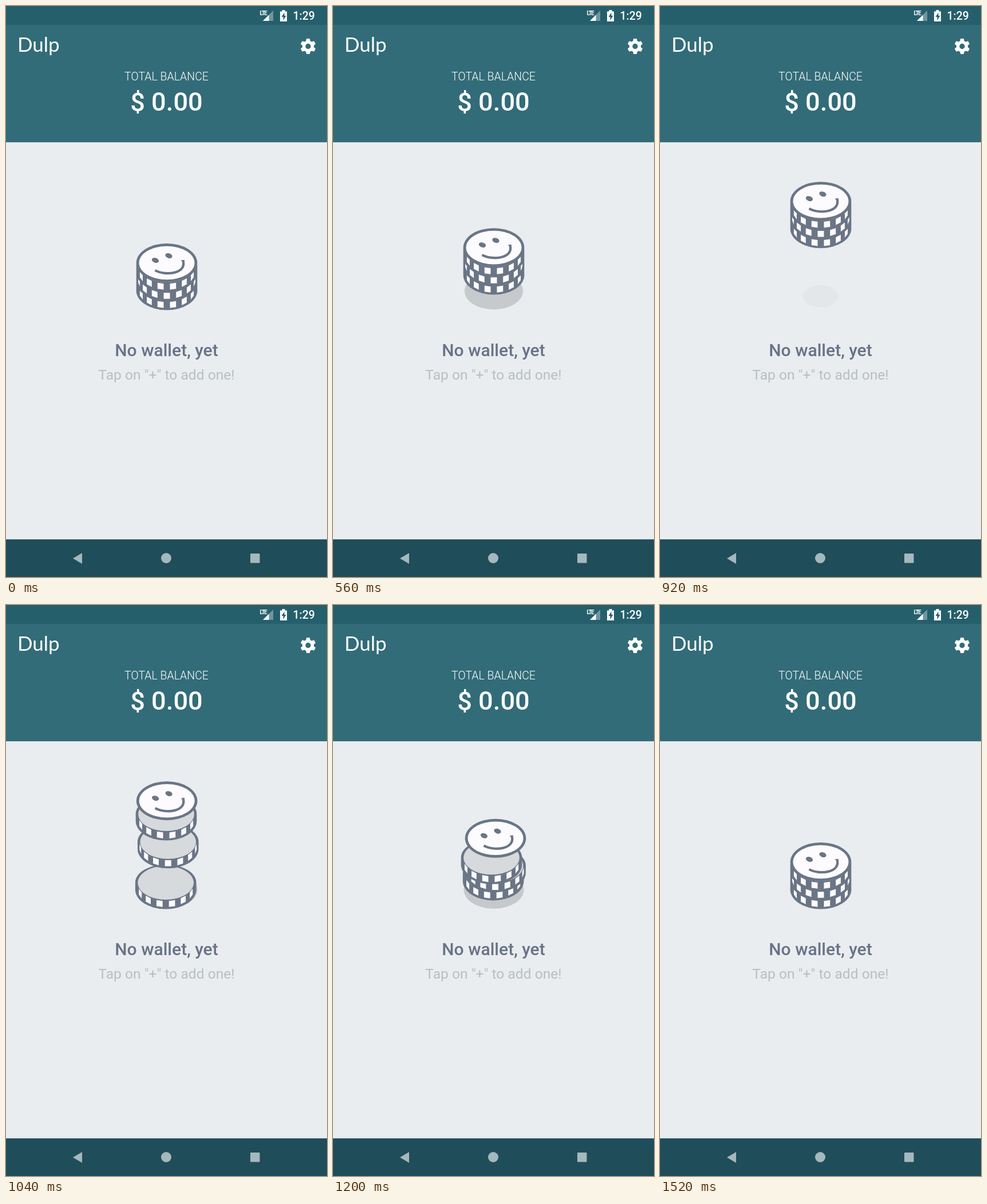
An HTML page for the animation above (1600 ms loop, 561 by 998 pixels).

```html
<!DOCTYPE html>
<html lang="en">
<head>
<meta charset="utf-8">
<title>Empty wallet</title>
<style>
  html, body { margin: 0; height: 100%; overflow: hidden; background: #e9edf0; }
  svg { display: block; width: 100vw; height: 100vh; font-family: Roboto, sans-serif; }
  .mid { text-anchor: middle; }
</style>
</head>
<body>
<svg viewBox="0 0 561 998">
  <rect width="561" height="998" fill="#e9edf0"/>
  <rect width="561" height="238.2" fill="#326c78"/>
  <rect width="561" height="33" fill="#265f6c"/>
  <rect y="932.2" width="561" height="66" fill="#1f4d5a"/>

  <g fill="#fff">
    <text x="443.5" y="15.5" font-size="10" font-weight="700" letter-spacing="-1.5">LTE</text>
    <path d="M467 8V26H449Z" opacity=".35"/>
    <path d="M459.5 15.5V26H449Z"/>
    <path d="M482.5 7h5v2.5h3.5v17.5h-12v-17.5h3.5z"/>
    <path d="M486.5 11.5v5.5h3l-5 8v-6h-3z" fill="#265f6c"/>
    <text x="501.5" y="24" font-size="19.5" font-weight="500">1:29</text>
    <text x="20" y="80" font-size="35" font-family="Lato, sans-serif">Dulp</text>
    <g id="gear" transform="translate(528 70.5)">
      <circle r="7.4" fill="none" stroke="#fff" stroke-width="5.4"/>
    </g>
    <text class="mid" x="280.5" y="130.3" font-size="19.5" font-weight="300">TOTAL BALANCE</text>
    <text class="mid" x="280.5" y="183.2" font-size="45.2" font-weight="500">$ 0.00</text>
  </g>

  <text class="mid" x="280.5" y="612" font-size="30" font-weight="500" fill="#697286">No wallet, yet</text>
  <text class="mid" x="280.5" y="653" font-size="24.6" fill="#b9bec1">Tap on "+" to add one!</text>

  <g fill="#a5b8be">
    <path d="M117 965.5L133 956V975Z"/>
    <circle cx="280" cy="965" r="9"/>
    <rect x="427" y="957" width="16.5" height="16.5" rx="1"/>
  </g>

  <ellipse id="shadow" rx="53.5" ry="34"/>
  <g id="stack"></g>
</svg>
<script>
const LOOP = 1600, STEP = 40, DARK = '#6a7586';
const $ = id => document.getElementById(id);

for (let a = 0; a < 360; a += 60)
  $('gear').innerHTML += `<path d="M-4 -8L-2.8 -13.5H2.8L4 -8Z" transform="rotate(${a})"/>`;

// One white patch on the rim, centred at an angle in degrees
function patch(deg) {
  const point = (d, dy) => {
    const a = d * Math.PI / 180;
    return `${(50.5 * Math.sin(a)).toFixed(2)} ${(34 * Math.cos(a) + dy).toFixed(2)}`;
  };
  const l = deg - 6.25, r = deg + 6.25;
  return `M${point(l, 2)}L${point(r, 2)}L${point(r, 12.5)}L${point(l, 12.5)}Z`;
}

function coin(first) {
  let rim = '';
  for (let a = first; a <= 75; a += 25) rim += patch(a);
  return `<path d="M-53.3 3.5A53.3 31.5 0 0 1 53.3 3.5V16A53.3 34 0 0 1 -53.3 16Z" fill="${DARK}"/>
    <ellipse cy="4" rx="48.8" ry="29.5" fill="#d6dadd"/>
    <path d="${rim}" fill="#fdfbfd"/>`;
}

const lid = `<ellipse rx="53.3" ry="34" fill="${DARK}"/>
  <ellipse rx="48.5" ry="29.3" fill="#fdfbfd"/>
  <g fill="${DARK}">
    <ellipse rx="6.3" ry="4.2" transform="translate(-20 -4.5) rotate(20)"/>
    <ellipse rx="6.3" ry="4.2" transform="translate(3.5 -12.5) rotate(20)"/>
  </g>
  <path d="M-20.5 13C-2 23 35 19 28.5 -4" fill="none" stroke="${DARK}" stroke-width="4.2"/>
  <path d="M25.5 -4H31" stroke="${DARK}" stroke-width="2"/>`;

// rest: resting height; peak: lift; drop, land, end: times in ms; hop: rebound; sway: sideways drift
const parts = [
  { art: coin(-62.5), rest: 481.5, peak: 111, drop: 930, land: 1040, end: 1260, hop: 19, sway: -1.8 },
  { art: coin(-75), rest: 465.5, peak: 111, drop: 942, land: 1081, end: 1265, hop: 15, sway: 4.5 },
  { art: coin(-62.5), rest: 449.5, peak: 111, drop: 950, land: 1150, end: 1270, hop: 12, sway: -4.8 },
  { art: lid, rest: 449, peak: 110.6, drop: 991, land: 1255, end: 1505, hop: 14, sway: 4.8 }
];
$('stack').innerHTML = parts.map(p => `<g>${p.art}</g>`).join('');
const nodes = [...$('stack').children];

function span(t, from, to) {
  return Math.min(1, Math.max(0, (t - from) / (to - from)));
}

function rise(t) {
  return (1 - Math.cos(Math.PI * span(t, 353, 984))) / 2;
}

function pose(p, t) {
  if (t < p.drop) return { x: 0, lift: p.peak * rise(t) };
  if (t < p.land) {
    const fall = span(t, p.drop, p.land) ** 2;
    return { x: p.sway * fall, lift: p.peak * rise(p.drop) * (1 - fall) };
  }
  const q = span(t, p.land, p.end);
  return { x: p.sway * (1 - q * q), lift: 4 * p.hop * q * (1 - q) };
}

function draw(now) {
  const t = Math.floor(now % LOOP / STEP) * STEP;
  parts.forEach((p, i) => {
    const { x, lift } = pose(p, t);
    nodes[i].setAttribute('transform', `translate(${281 + x} ${p.rest - lift})`);
  });
  const height = pose(parts[0], t).lift / parts[0].peak;
  const size = 1 - 0.44 * height ** 1.6;
  $('shadow').setAttribute('transform', `translate(281 ${521.5 - 24.5 * size}) scale(${size})`);
  $('shadow').setAttribute('opacity', 0.155 * (1 - 0.87 * height ** 2.2));
}

const start = performance.now();
function tick() {
  draw(performance.now() - start);
  requestAnimationFrame(tick);
}
tick();
</script>
</body>
</html>
```
